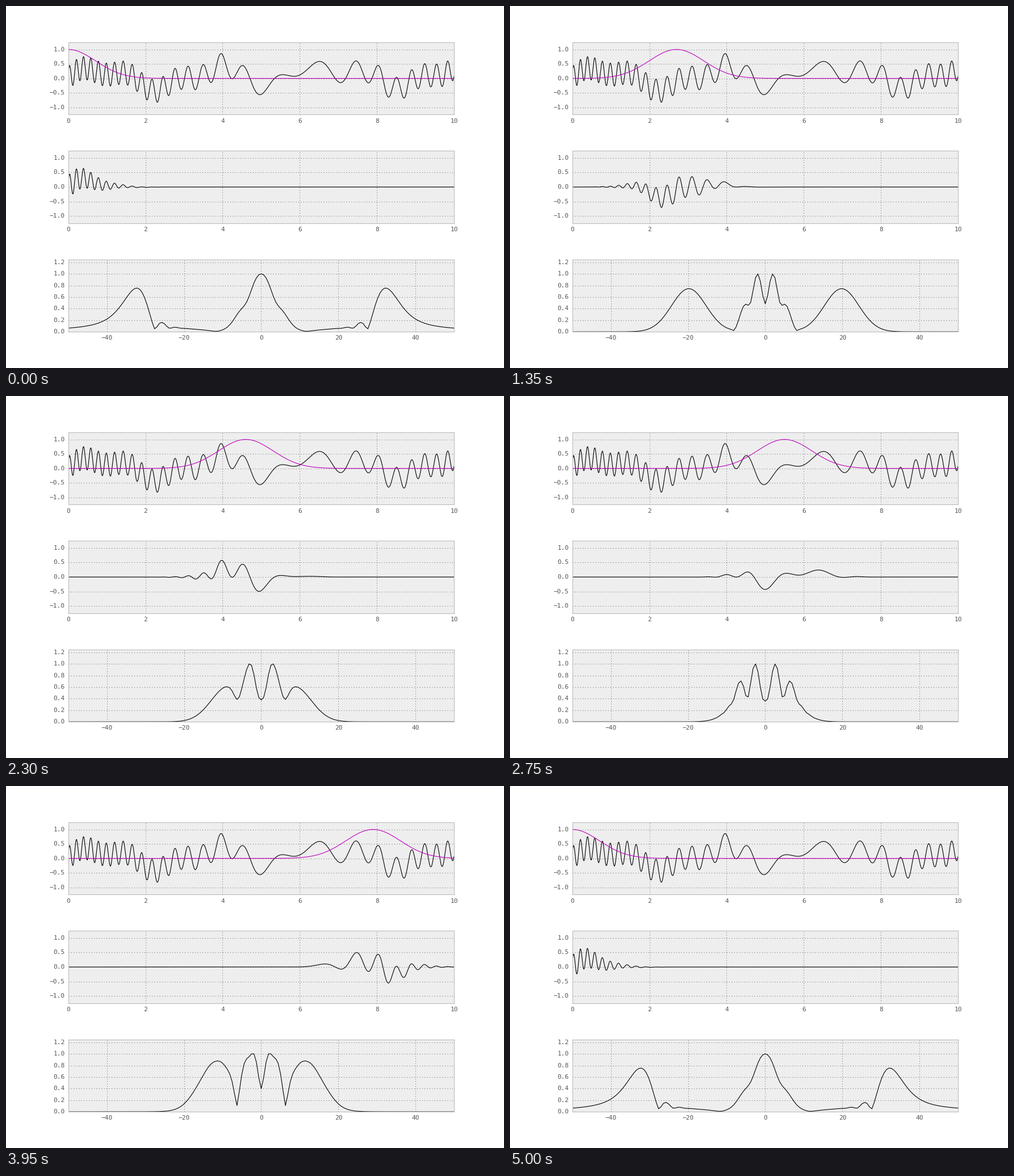
A matplotlib script that plays this animation: 877x638 px, repeating every 5.05 s.

```python
import numpy as np
import matplotlib.pyplot as plt
from matplotlib.animation import FuncAnimation

WIDTH, HEIGHT, DPI = 877, 638, 80
FRAMES, INTERVAL = 101, 50
SPAN, N = 10, 2048

plt.rcParams.update({
    "font.family": "DejaVu Sans Mono",
    "font.size": 10,
    "lines.linewidth": 1.0,
    "lines.scale_dashes": False,
    "axes.facecolor": "#eeeeee",
    "axes.edgecolor": "#bcbcbc",
    "axes.linewidth": 1.0,
    "axes.axisbelow": True,
    "axes.unicode_minus": True,
    "ytick.alignment": "center",
})

t = np.linspace(0, SPAN, N + 1)[:-1]
k = np.fft.fftshift(np.fft.fftfreq(N, SPAN / N)) * 2 * np.pi
signal = (3 * np.sin(2 * t) + 0.3 * np.exp(-(t - 4) ** 2)
          + 1.5 * np.sin(5 * t) + 4 * np.cos(3 * (t - 6) ** 2)) / 10 + (t / 20) ** 3


def style(ax, xlim, ylim, xticks, yticks):
    ax.set(xlim=xlim, ylim=ylim, xticks=xticks, yticks=yticks)
    ax.yaxis.set_major_formatter("{x:.1f}")
    ax.grid(True, color="black", linewidth=0.5, linestyle=(0, (1, 3)))
    ax.tick_params(length=0, pad=5.5, labelcolor="#555555")


fig, (top, mid, low) = plt.subplots(
    3, 1, figsize=(WIDTH / DPI, HEIGHT / DPI), dpi=DPI, facecolor="white")
fig.subplots_adjust(left=0.125, right=0.9, bottom=0.1, top=0.9, hspace=0.5)

for ax in (top, mid):
    style(ax, (0, SPAN), (-1.25, 1.25), range(0, 11, 2), np.linspace(-1, 1, 5))
style(low, (-50, 50), (0, 1.25), range(-40, 41, 20), np.linspace(0, 1.2, 7))

top.plot(t, signal, "k")
window_line, = top.plot([], [], "m")
product_line, = mid.plot([], [], "k")
spectrum_line, = low.plot([], [], "k")


def draw(i):
    center = i % (FRAMES - 1) * 0.1
    window = np.exp(-(t - center) ** 2)
    product = window * signal
    spectrum = np.abs(np.fft.fftshift(np.fft.fft(product)))
    window_line.set_data(t, window)
    product_line.set_data(t, product)
    spectrum_line.set_data(k, spectrum / spectrum.max())
    return window_line, product_line, spectrum_line


anim = FuncAnimation(fig, draw, frames=FRAMES, init_func=lambda: draw(0),
                     interval=INTERVAL, repeat=True, repeat_delay=0)
plt.show()
```
